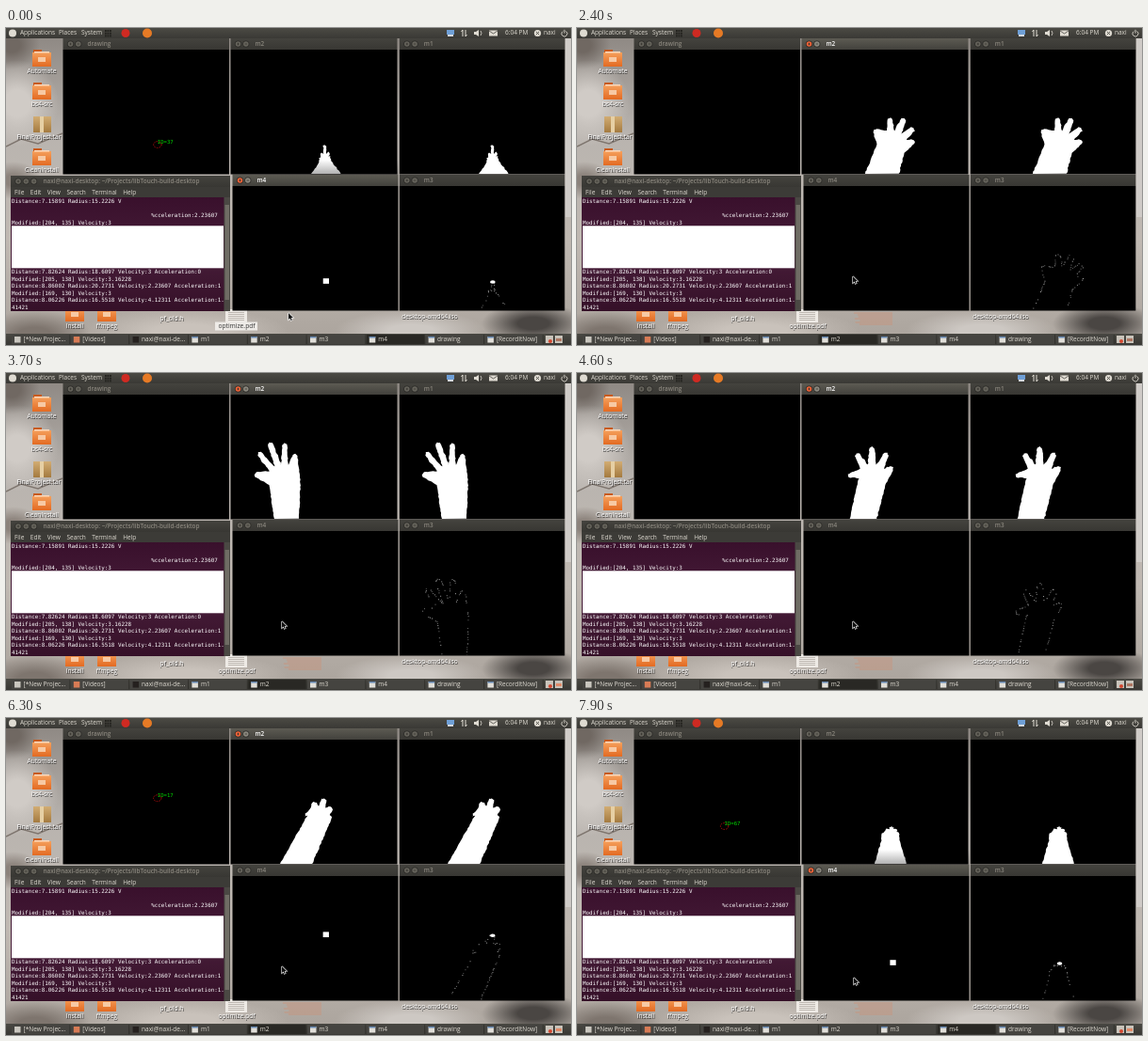
An HTML page with a canvas that plays this animation: 600x337 px, repeating every 8 s.

```html
<!DOCTYPE html>
<html lang="en">
<head>
<meta charset="utf-8">
<title>Touch tracking desktop</title>
<style>
html, body { margin: 0; width: 100%; height: 100%; overflow: hidden; background: #3c3b37; }
canvas { display: block; }
</style>
</head>
<body>
<canvas width="600" height="337"></canvas>
<script>
const ctx = document.querySelector('canvas').getContext('2d');
const SANS = '"Open Sans", sans-serif', MONO = '"DejaVu Sans Mono", monospace';
const LOOP = 8000, STEP = 100, FLOOR = 155;

// Arm base x and half width, palm x, y and radius, tilt and spread in degrees, reach, curl.
const raised = [340, 16, 339, 142, 8, -2, 22, 18, 0.4];
const pointing = [303, 16, 328, 106, 19, 8, 24, 34, 0.4];
const relaxed = [324, 18, 333, 128, 19, 24, 25, 35, 0.06];
const spread = [298, 13, 296, 118, 21, -20, 20, 47, 0.07];
const reaching = [311, 16, 334, 112, 15, 22, 38, 25, 0.07];
const pinching = [306, 18, 329, 107, 16, 12, 22, 25, 0.25];
const lowered = [333, 17, 333, 130, 12, 4, 22, 15, 0.1];
const handKeys = [[0, raised], [1200, pointing], [2400, relaxed], [3700, spread],
  [5600, reaching], [6900, pinching], [7900, lowered]];
const cursorKeys = [[0, [300, 303]], [1100, [280, 150]], [2000, [293, 264]],
  [6300, [293, 264]], [6900, [304, 192]], [7800, [294, 276]]];

function at(keys, t) {
  const next = keys.findIndex(k => k[0] > t);
  if (next < 0) return keys[keys.length - 1][1];
  const [t0, a] = keys[next - 1], [t1, b] = keys[next];
  let p = (t - t0) / (t1 - t0);
  p = p * p * (3 - 2 * p);
  return a.map((v, i) => v + (b[i] - v) * p);
}

function noise(a, b = 0) {
  const n = Math.sin(a * 127.1 + b * 311.7) * 43758.5453;
  return n - Math.floor(n);
}

function box(color, x, y, w, h) {
  ctx.fillStyle = color;
  ctx.fillRect(x, y, w, h);
}

function disc(color, x, y, r, ry = r) {
  ctx.fillStyle = color;
  ctx.beginPath();
  ctx.ellipse(x, y, r, ry, 0, 0, 7);
  ctx.fill();
}

function shape(points, color) {
  ctx.fillStyle = color;
  ctx.beginPath();
  points.forEach(p => ctx.lineTo(p[0], p[1]));
  ctx.closePath();
  ctx.fill();
}

function line(color, width, ...points) {
  ctx.strokeStyle = color;
  ctx.lineWidth = width;
  ctx.beginPath();
  points.forEach(p => ctx.lineTo(p[0], p[1]));
  ctx.stroke();
}

function text(s, x, y, color = '#dfdbd2', font = '6.5px ' + SANS, align = 'left') {
  ctx.font = font;
  ctx.fillStyle = color;
  ctx.textAlign = align;
  ctx.textBaseline = 'middle';
  ctx.fillText(s, x, y + 0.7);
}

function fade(x, y, w, h, ...colors) {
  const g = ctx.createLinearGradient(0, y, 0, y + h);
  colors.forEach((c, i) => g.addColorStop(i / (colors.length - 1), c));
  box(g, x, y, w, h);
}

// A soft-edged stone; the colour is an "r,g,b" string.
function stone(rgb, x, y, rx, ry) {
  ctx.save();
  ctx.translate(x, y);
  ctx.scale(rx, ry);
  const g = ctx.createRadialGradient(0, 0, 0.3, 0, 0, 1);
  g.addColorStop(0, `rgb(${rgb})`);
  g.addColorStop(1, `rgba(${rgb},0)`);
  disc(g, 0, 0, 1);
  ctx.restore();
}

function label(s, x, y) {
  const font = '6.7px ' + SANS;
  text(s, x + 0.6, y + 0.7, 'rgba(0,0,0,.75)', font, 'center');
  text(s, x, y, '#fff', font, 'center');
}

function folder(name, x, y) {
  box('#c85a1e', x - 9, y - 10, 9, 5);
  fade(x - 10, y - 7, 20, 15, '#f5a05c', '#e36a22');
  box('#fbd9bd', x - 8, y - 8, 16, 1.5);
  box('#f7c9a4', x - 4, y - 2, 8, 5);
  label(name, x, y + 12.5);
}

function desktop(t) {
  fade(0, 0, 600, 337, '#8b8580', '#b9b4af', '#c0b9b2', '#aaa39c');
  stone('112,104,98', 6, 18, 30, 26);
  stone('208,203,198', 12, 80, 44, 46);
  stone('140,131,124', 8, 162, 30, 20);
  stone('126,117,110', 30, 326, 60, 26);
  stone('201,194,187', 190, 322, 110, 24);
  stone('205,200,195', 430, 322, 80, 22);
  stone('74,70,67', 560, 314, 55, 22);
  line('#7f766f', 1.5, [0, 126], [16, 118], [34, 123], [60, 112]);
  box('#cfcbc7', 594, 11, 6, 190);

  ['Automate', 'bs4-src', '', 'CleanInstall'].forEach((name, i) => name && folder(name, 38, 33 + i * 35));
  fade(29, 94, 19, 17, '#d2ad74', '#a47a3f');
  box('#e6cfa4', 36, 94, 4, 17);
  label('FinalProject.tar', 35, 115.5);
  folder('Install', 73, 304);
  folder('ffmpeg', 107, 304);
  label('pf_old.h', 176, 309);
  box('#eeeae5', 233, 299, 23, 14);
  for (let y = 302; y < 312; y += 2) box('#aaa49d', 236, y, 17, 0.7);
  if (t < 1000) {
    box('#eeebe7', 222, 312.5, 45, 9);
    text('optimize.pdf', 245, 317, '#333', '6.7px ' + SANS, 'center');
  } else {
    label('optimize.pdf', 245, 317);
    for (let y = 303; y < 317; y += 2) line('#cf8d70', 0.7, [293 + 9 * noise(y), y], [335, y]);
  }
  label('desktop-amd64.iso', 450, 307);
}

function topPanel() {
  fade(0, 0, 600, 11, '#4b4a44', '#3a3935');
  disc('#dfdbd2', 7, 5.5, 4);
  text('Applications', 15, 5);
  text('Places', 56, 5);
  text('System', 80, 5);
  for (let i = 0; i < 9; i++) box('#24231f', 105 + i % 3 * 2.5, 2 + Math.floor(i / 3) * 2.7, 1.8, 2);
  disc('#cf2a22', 127, 5.5, 4.5);
  disc('#e67a25', 150, 5.5, 5);
  box('#6f9fd6', 468, 2, 8, 5);
  box('#d5dbe2', 469, 7, 6, 2);
  line('#dfdbd2', 1, [485, 9], [485, 2], [483.5, 4]);
  line('#dfdbd2', 1, [488, 2], [488, 9], [489.5, 7]);
  shape([[497, 4], [499, 4], [502, 2], [502, 9], [499, 7], [497, 7]], '#dfdbd2');
  line('#dfdbd2', 0.8, [504, 3], [505, 5.5], [504, 8]);
  box('#dfdbd2', 513, 2.5, 9, 6);
  line('#4b4a44', 0.8, [513, 3], [517.5, 6], [522, 3]);
  text('6:04 PM', 530, 5);
  disc('#dfdbd2', 564.5, 5.5, 3.6);
  line('#4b4a44', 0.9, [563, 4], [566, 7]);
  line('#4b4a44', 0.9, [566, 4], [563, 7]);
  text('naxi', 571, 5);
  ctx.strokeStyle = '#dfdbd2';
  ctx.lineWidth = 0.9;
  ctx.beginPath();
  ctx.arc(593, 6, 3, -1, 4.1);
  ctx.stroke();
  line('#dfdbd2', 0.9, [593, 1.8], [593, 5.5]);
}

function taskbar(active, t) {
  fade(0, 325, 600, 12, '#4a4943', '#393834');
  const tasks = ['[*New Projec...', '[Videos]', 'naxi@naxi-de...', 'm1', 'm2', 'm3', 'm4', 'drawing', '[RecordItNow]'];
  const tints = ['#c9c6be', '#d87b55', '#25211f'];
  tasks.forEach((name, i) => {
    const x = 6 + i * 62.8;
    box(name === active ? '#292824' : '#454440', x, 326, 61.5, 10);
    box('#2f2e2a', x + 61.5, 326, 0.8, 10);
    box(tints[i] || '#e1dfd9', x + 3, 328, 6.5, 6.5);
    if (i > 2) box('#6486b0', x + 3, 328, 6.5, 1.5);
    text(name, x + 12.5, 331);
  });
  box('#c9c4bb', 573, 327, 8, 8);
  disc('#d4472f', 578, 333, 2);
  box('#c9c4bb', 583, 327, 8, 8);
  box(t % 200 ? '#e28a68' : '#ad7662', 584, 330, 6, 3);
}

function frame(name, x, y, w, active, buttons = 2) {
  if (active) {
    fade(x, y - 16, w, 16, 'rgba(0,0,0,0)', 'rgba(0,0,0,.32)');
    fade(x, y, w, 12, '#5d5b53', '#42413c');
  } else {
    fade(x, y, w, 12, '#44433e', '#383733');
  }
  for (let i = 0; i < buttons; i++) {
    const bx = x + 8 + i * 8.3, by = y + 6;
    disc('#2c2b28', bx, by, 3.6);
    disc(active ? (i ? '#8b887e' : '#ee6338') : '#65635b', bx, by, 2.8);
    line('#36342f', 0.8, [bx - 1.2, by], [bx + 1.2, by]);
    if (!i) line('#36342f', 0.8, [bx, by - 1.2], [bx, by + 1.2]);
  }
  text(name, x + 9 + buttons * 8.5, y + 5.3, active ? '#fff' : '#8a867d', '600 6.4px ' + SANS);
}

function view(name, x, y, w, active) {
  box('#000', x, y + 12, w, 132.5);
  frame(name, x, y, w, active);
}

function terminal() {
  frame('naxi@naxi-desktop: ~/Projects/libTouch-build-desktop', 5, 157, 233, false, 3);
  box('#3c3b37', 5, 169, 233, 11);
  let x = 9;
  for (const item of ['File', 'Edit', 'View', 'Search', 'Terminal', 'Help']) {
    text(item, x, 175);
    x += ctx.measureText(item).width + 6.5;
  }
  fade(5, 180, 233, 121, '#39102c', '#471d39', '#351028');
  box('#4a4843', 231.5, 180, 6.5, 121);
  box('#6f6c64', 232.5, 188, 4.5, 101);
  box('#fff', 6, 210.3, 225, 45);
  const head = ['Distance:7.15891 Radius:15.2226 V', '', ' '.repeat(42) + '%cceleration:2.23607',
    'Modified:[204, 135] Velocity:3'];
  const tail = ['Distance:7.82624 Radius:18.6097 Velocity:3 Acceleration:0',
    'Modified:[205, 138] Velocity:3.16228',
    'Distance:8.86002 Radius:20.2731 Velocity:2.23607 Acceleration:1',
    'Modified:[169, 130] Velocity:3',
    'Distance:8.06226 Radius:16.5518 Velocity:4.12311 Acceleration:1.', '41421'];
  const print = (rows, top) => rows.forEach((s, i) => text(s, 6, top + i * 7.5, '#fff', '5.86px ' + MONO));
  print(head, 184);
  print(tail, 259);
}

// Builds the arm, palm and five fanned fingers as one outline with the fingertips.
function hand([baseX, baseW, px, py, r, tilt, fan, reach, curl]) {
  const rad = Math.PI / 180, tips = [];
  const polar = (deg, d, side = 0) => {
    const s = Math.sin(deg * rad), c = Math.cos(deg * rad);
    return [px + s * d + c * side, py - c * d + s * side];
  };
  const arm = Math.atan2(px - baseX, FLOOR - py) / rad;
  const width = Math.min(2.7, r * fan * rad / 2);
  const points = [[baseX - baseW, FLOOR], polar(arm, 0, -0.8 * r)];
  for (let i = 0; i < 5; i++) {
    const angle = tilt + fan * (i ? i - 2 : -2.6);
    const length = Math.max(r, reach * (1 - curl * (i - 2) ** 2));
    if (i) points.push(polar(angle - fan / 2, r));
    points.push(polar(angle, length - 1.5, -width), polar(angle, length), polar(angle, length - 1.5, width));
    tips.push(polar(angle, length));
  }
  points.push(polar(arm, 0, 0.8 * r), [baseX + baseW, FLOOR]);
  return { points, tips };
}

// Splits an outline into short steps with a slightly ragged edge.
function ragged(points, beat) {
  const out = [points[0]];
  points.slice(1).forEach(([x2, y2], i) => {
    const [x, y] = points[i], n = Math.ceil(Math.hypot(x2 - x, y2 - y) / 2.2);
    for (let k = 1; k <= n; k++) {
      const seed = i * 9 + k;
      out.push([x + (x2 - x) * k / n + noise(seed, beat) - 0.5,
                y + (y2 - y) * k / n + noise(seed, beat + 7) - 0.5]);
    }
  });
  return out;
}

function clipped(dx, dy, draw) {
  ctx.save();
  ctx.translate(dx, dy);
  ctx.beginPath();
  ctx.rect(240, 23, 175, 132);
  ctx.clip();
  draw();
  ctx.restore();
}

function trackedTips(tips, t) {
  if (t >= 4700 && t < 6300) {
    return tips.map(([x, y], i) => ({ x, y, id: (i * 2 + 3) % 10 * 10 + 7, size: i < 3 ? 7.5 : 5, thumb: !i }));
  }
  if (t >= 1700 && t < 6300) return [];
  const [x, y] = tips[2];
  return [{ x: x + 1.5, y, id: t < 700 ? 37 : t < 7400 ? 17 : 67, size: 6.3 }];
}

function marker({ x, y, id, thumb }) {
  ctx.strokeStyle = thumb ? '#00d800' : '#d51212';
  ctx.lineWidth = 0.8;
  ctx.setLineDash(thumb ? [] : [1.5, 1.2]);
  ctx.beginPath();
  ctx.ellipse(x, y, 4.2, 3.4, 0, 0, 7);
  ctx.stroke();
  ctx.setLineDash([]);
  text('ID=' + id, x, y - 3, '#00d800', '5.6px ' + MONO);
}

function cursor([x, y]) {
  const arrow = [[0, 0], [0, 7], [1.6, 5.5], [2.6, 8], [3.8, 7.5], [2.8, 5], [5, 5]]
    .map(p => [x + p[0], y + p[1]]);
  line('#fff', 1.2, ...arrow, arrow[0]);
  shape(arrow, '#111');
}

function render(t) {
  const active = t < 1100 || t >= 6600 ? 'm4' : 'm2', beat = t / STEP;
  const { points, tips } = hand(at(handKeys, t));
  const edge = ragged(points, beat), tracked = trackedTips(tips, t);

  desktop(t);
  view('drawing', 60.5, 11, 176.5, false);
  view('m2', 238.5, 11, 177, active === 'm2');
  view('m1', 417.8, 11, 175.5, false);
  clipped(0, 0, () => shape(edge, '#fff'));
  clipped(178, 0, () => shape(edge, '#fff'));
  clipped(-179, 0, () => tracked.forEach(marker));
  terminal();
  view('m4', 240.5, 156, 176, active === 'm4');
  view('m3', 417.8, 156, 175.5, false);
  clipped(0, 145, () => tracked.forEach(({ x, y, size }) => box('#fff', x - size / 2, y - size * 0.45, size, size * 0.9)));
  clipped(178, 145, () => {
    edge.forEach(([x, y], i) => {
      const level = noise(i, beat + 3);
      if (level > 0.5) box(`rgba(255,255,255,${level * 0.7})`, x, y, 1, 1);
    });
    tracked.forEach(({ x, y }) => disc('#fff', x - 1, y + 1, 2.8, 1.7));
  });
  topPanel();
  taskbar(active, t);
  cursor(at(cursorKeys, t));
}

const start = performance.now();
let shown = -1;
function tick() {
  const t = Math.floor((performance.now() - start) % LOOP / STEP) * STEP;
  if (t !== shown) render(shown = t);
  requestAnimationFrame(tick);
}
tick();
</script>
</body>
</html>
```
